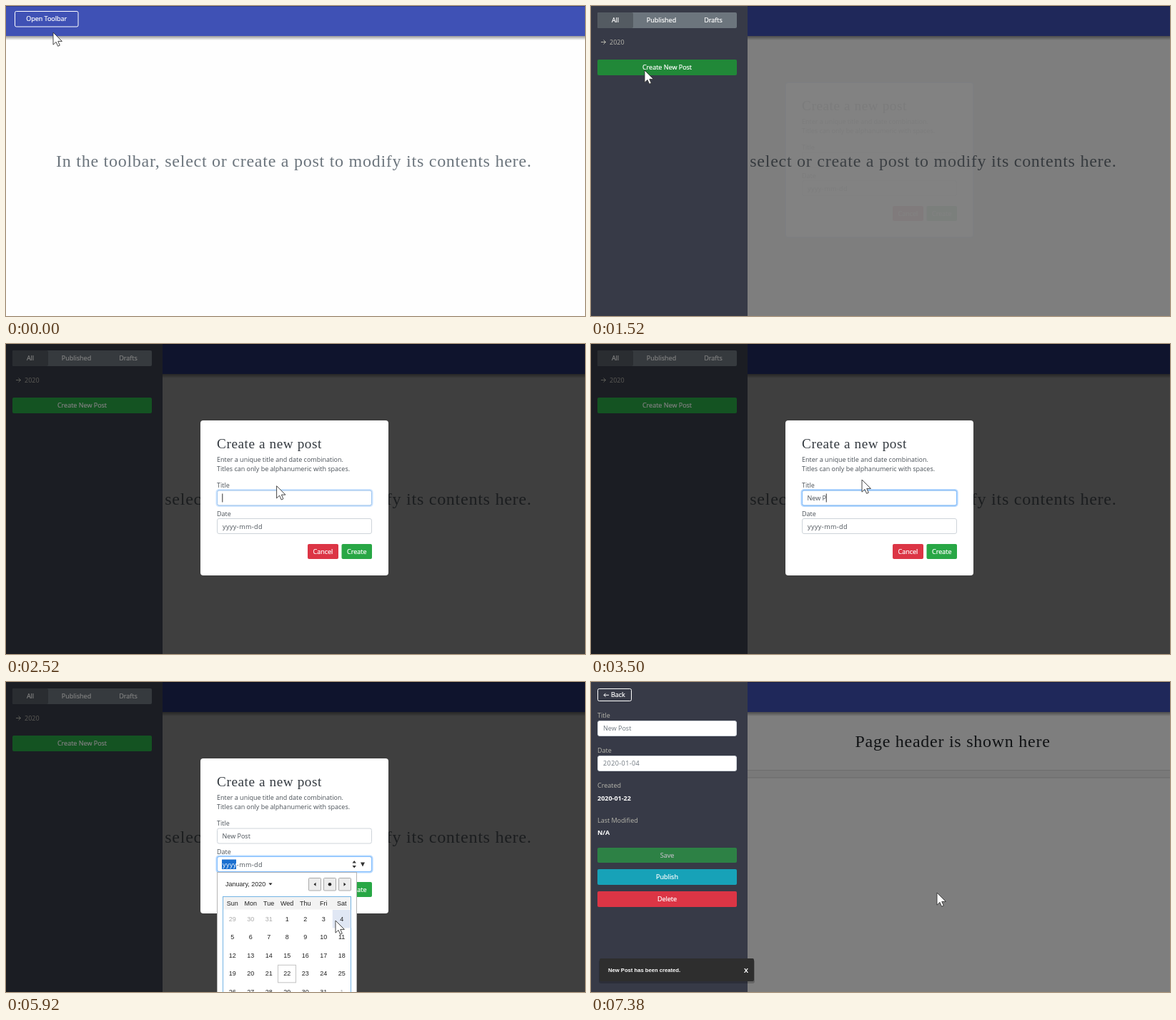
An HTML page that plays this animation: 810x434 px, repeating every 8.66 s.

```html
<!DOCTYPE html>
<html lang="en">
<head>
<meta charset="utf-8">
<title>Create a post</title>
<style>
html, body { margin: 0; width: 100%; height: 100%; overflow: hidden; background: #fff; }
svg { display: block; width: 100vw; height: 100vh; }
text { font: 9px 'Open Sans', sans-serif; white-space: pre; }
.serif { font-family: 'Liberation Serif', serif; font-size: 24px; letter-spacing: .031em; }
.head { font-size: 19.2px; fill: #343a40; }
.white { fill: #fff; stroke: #fff; stroke-width: .22px; }
.bold { font-weight: 700; fill: #fff; }
.soft { fill: #b8b7ad; }
.ink { fill: #495057; }
.hint { fill: #6c757d; }
.date { letter-spacing: .42px; }
.cal { font-family: 'Liberation Sans', sans-serif; fill: #222; }
.off { fill: #aaa; }
.toast { font: 700 7.65px 'Liberation Sans', sans-serif; fill: #fff; }
</style>
</head>
<body>
<svg id="stage" viewBox="0 0 810 434" preserveAspectRatio="none"></svg>
<script>
const LOOP = 8660;
const GREEN = '#28a745', RED = '#dc3545', TEAL = '#17a2b8';

const rect = (x, y, w, h, fill, extra = '') =>
  `<rect x="${x}" y="${y}" width="${w}" height="${h}" fill="${fill}" ${extra}/>`;
const text = (x, y, str, cls = '', extra = '') =>
  `<text x="${x}" y="${y}" class="${cls}" ${extra}>${str}</text>`;
const mid = (x, y, str, cls, extra = '') => text(x, y, str, cls, `text-anchor="middle" ${extra}`);
const group = (id, body, extra = '') => `<g id="${id}" ${extra}>${body}</g>`;
const button = (x, y, w, h, label, fill, id = '') =>
  rect(x, y, w, h, fill, `rx="2" id="${id}"`) + mid(x + w / 2, y + h / 2 + 3.2, label, 'white');
const field = (x, y, w, ring) =>
  rect(x + .5, y + .5, w - 1, 21, '#fff', 'rx="2.5" stroke="#ced4da"') +
  (ring ? group(ring,
    rect(x - .6, y - .6, w + 1.2, 23.2, 'none', 'rx="3.5" stroke="#007bff" stroke-opacity=".28" stroke-width="2"') +
    rect(x + .5, y + .5, w - 1, 21, 'none', 'rx="2.5" stroke="#80bdff"')) : '');

function page() {
  const hint = 'In the toolbar, select or create a post to modify its contents here.';
  return rect(0, 0, 810, 434, '#fefefe') +
    rect(0, 42, 810, 6, 'url(#shade)') +
    rect(0, 0, 810, 42, '#3f51b5') + rect(0, 0, 810, 1, '#000', 'opacity=".25"') +
    rect(12.5, 7.5, 88.5, 21.5, 'none', 'rx="2" stroke="#fff"') +
    mid(56.7, 21.2, 'Open Toolbar', 'white') +
    group('hint', text(70, 225, hint, 'serif hint')) +
    group('preview', mid(506, 91, 'Page header is shown here', 'serif', 'fill="#212529"') +
      rect(219, 123, 591, 11, '#f4f4f4') +
      rect(219, 123, 591, 1, '#dcdcdc') + rect(219, 133.5, 591, 1, '#d6d6d6'));
}

function listPanel() {
  return rect(9, 9, 195, 22, '#6c757d', 'rx="2"') + rect(9, 9, 50, 22, '#545b62', 'rx="2"') +
    mid(34, 23.2, 'All', 'white') + mid(98.5, 23.2, 'Published', 'white') + mid(171, 23.2, 'Drafts', 'white') +
    '<path d="M14 50.5h6.5m-3-3 3 3-3 3" fill="none" stroke="#b8b7ad"/>' +
    text(26, 53.8, '2020', 'soft') +
    button(9, 75, 195, 22, 'Create New Post', GREEN, 'newPost');
}

function postPanel() {
  return rect(9.5, 9.5, 47, 17, 'none', 'rx="2" stroke="#fff"') +
    '<path d="M25 18.3h-7m2.5-2.5-2.5 2.5 2.5 2.5" fill="none" stroke="#fff"/>' +
    text(28, 21.3, 'Back', 'white') +
    text(9, 50, 'Title', 'soft') + field(9, 54, 195) + text(17, 68.2, 'New Post', 'hint') +
    text(9, 99, 'Date', 'soft') + field(9, 103, 195) + text(17, 117.2, '2020-01-04', 'hint date') +
    text(9, 147.8, 'Created', 'soft') + text(9, 165.7, '2020-01-22', 'bold') +
    text(9, 196.5, 'Last Modified', 'soft') + text(9, 214.4, 'N/A', 'bold') +
    `<g opacity=".65">${button(9, 232, 195, 21, 'Save', GREEN)}</g>` +
    button(9, 262, 195, 22, 'Publish', TEAL) + button(9, 293, 195, 22, 'Delete', RED);
}

function modal() {
  return rect(272, 107, 263, 217, '#fff', 'rx="4"') +
    rect(272, 107, 263, 217, 'none', 'id="outline" rx="4" stroke="#5b93d6" stroke-width="1.5"') +
    text(295, 146, 'Create a new post', 'serif head') +
    text(295, 165, 'Enter a unique title and date combination.', 'ink') +
    text(295, 178.4, 'Titles can only be alphanumeric with spaces.', 'ink') +
    text(295, 201, 'Title', 'ink') + field(295, 204.5, 217, 'titleRing') +
    text(302.5, 218.8, '', 'ink', 'id="title"') + rect(302, 209.5, 1, 12, '#333', 'id="caret"') +
    text(295, 240.8, 'Date', 'ink') + field(295, 244, 217, 'dateRing') +
    rect(302, 248.5, 20, 13.5, '#1a6fd0', 'id="select"') +
    text(303, 258.5, '<tspan id="year"></tspan><tspan id="rest"></tspan>', 'ink date') +
    group('spinner', '<path d="M484.5 253.5l2.7-3.5 2.7 3.5zM484.5 257l2.7 3.5 2.7-3.5zM496 252.5h6l-3 6z" fill="#333"/>') +
    button(422, 280, 43, 21, 'Cancel', RED) + button(469.5, 280, 42.5, 21, 'Create', GREEN);
}

function calendar() {
  const colX = c => 316.7 + c * 25.5;
  let s = rect(295.5, 266.5, 195, 180, '#fff', 'stroke="#b5b5b5"') +
    text(307, 286.3, 'January, 2020', 'cal') + '<path d="M367.5 281.5h5l-2.5 3z" fill="#222"/>';
  for (const x of [423.5, 444.5, 465.5])
    s += rect(x, 274.5, 17, 17.5, '#ececec', 'rx="1" stroke="#aaa"');
  s += '<path d="M433.5 280.8v5l-3-2.5zM472.5 280.8v5l3-2.5z" fill="#222"/><circle cx="453" cy="283.3" r="2.3" fill="#222"/>' +
    rect(303.5, 300.5, 179, 150, '#fff', 'stroke="#74b4e4"') + rect(304, 301, 178, 17.5, '#f3f3f3') +
    rect(0, 0, 25.5, 25.4, '#e0e7f4', 'id="hover"') +
    rect(380.5, 396.3, 25, 24.5, 'none', 'stroke="#c4c4c4"');
  ['Sun', 'Mon', 'Tue', 'Wed', 'Thu', 'Fri', 'Sat'].forEach((d, c) => s += mid(colX(c), 312.6, d, 'cal'));
  for (let i = 0; i < 35; i++) {
    const n = i - 2, out = n < 1 || n > 31;
    s += mid(colX(i % 7), 335 + Math.floor(i / 7) * 25.4, n < 1 ? n + 31 : n > 31 ? n - 31 : n,
      out ? 'cal off' : 'cal');
  }
  return s;
}

const pointer = (id, d) => `<path id="${id}" d="${d}" fill="#fff" stroke="#333" stroke-width=".9" stroke-linejoin="round"/>`;

const stage = document.getElementById('stage');
stage.innerHTML =
  '<defs><linearGradient id="shade" x2="0" y2="1"><stop stop-opacity=".4"/><stop offset="1" stop-opacity="0"/></linearGradient></defs>' +
  page() + rect(0, 0, 810, 434, '#000', 'id="overlay"') +
  group('sidebar', rect(0, 0, 219, 434, '#373a47') + group('list', listPanel()) + group('post', postPanel())) +
  rect(0, 0, 810, 434, '#000', 'id="backdrop"') +
  group('modal', modal()) + group('calendar', calendar()) +
  group('toast', rect(11, 389, 218, 33, '#000', 'rx="3" opacity=".2"') + rect(12, 387, 216, 32, '#2e2e2e', 'rx="2"') +
    text(24, 405.8, 'New Post has been created.', 'toast') + mid(217, 406.5, 'X', 'bold')) +
  group('cursor',
    pointer('arrow', 'M0 0V17.2L4 13.4 6.6 19.3 9.3 18.1 6.8 12.4H12.4Z') +
    pointer('hand', 'M-1.7 1.5a1.9 1.9 0 0 1 3.8 0V7q2.2-1 3.2.8 2.3-.8 3 .9 2.3-.4 2.3 1.8V14q0 3-2 5v3H.5V20.5Q-2 18-4 15q-3.5-2.5-2.5-4 1.5-1.5 4 .8Z') +
    '<path id="beam" d="M-3-8q3 0 3 2 0-2 3-2M0-6V6M-3 8q3 0 3-2 0 2 3 2" fill="none" stroke="#333"/>');

const el = {};
stage.querySelectorAll('[id]').forEach(n => { if (n.id) el[n.id] = n; });

const ramp = (t, a, b) => Math.min(1, Math.max(0, (t - a) / (b - a)));
const easeOut = p => 1 - (1 - p) ** 3;
const easeBoth = p => p * p * (3 - 2 * p);
const fade = (id, v) => el[id].setAttribute('opacity', v);
const show = (id, on) => { el[id].style.display = on ? '' : 'none'; };

// start, end, x, y of each pointer move
const moves = [
  [0, 0, 66, 37], [190, 320, 61, 13], [850, 1400, 75, 90], [1860, 2300, 378, 212],
  [2390, 2620, 379, 190], [4220, 4740, 514, 291], [4740, 5030, 499, 256],
  [5250, 5910, 461, 334], [6200, 6920, 484, 295]
];
function pointerAt(t) {
  let [, , x, y] = moves[0];
  for (const [a, b, nx, ny] of moves.slice(1)) {
    const p = easeBoth(ramp(t, a, b));
    x += (nx - x) * p;
    y += (ny - y) * p;
  }
  return [x, y];
}

const keys = [2850, 2950, 3060, 3170, 3500, 3610, 3640, 3730];

function draw(t) {
  const [x, y] = pointerAt(t);
  const saved = t >= 7260, picked = t >= 6140;

  const slide = easeOut(ramp(t, 500, 1040));
  el.sidebar.setAttribute('transform', `translate(${-222 * (1 - slide)} 0)`);
  fade('overlay', .5 * ramp(t, 500, 820));
  show('hint', !saved);
  show('preview', saved);
  show('list', !saved);
  show('post', saved);
  const onNew = x > 9 && x < 204 && y > 75 && y < 97 && t < 1620;
  el.newPost.setAttribute('fill', onNew ? '#218838' : GREEN);

  fade('backdrop', .5 * ramp(t, 1520, 1795) * (1 - ramp(t, 7135, 7370)));
  fade('modal', ramp(t, 1515, 1730) * (1 - .25 * ramp(t, 7000, 7140) - .75 * ramp(t, 7150, 7260)));
  fade('outline', 1 - ramp(t, 2150, 2300));

  const typed = keys.filter(k => t >= k).length;
  el.title.textContent = 'New Post'.slice(0, typed);
  fade('titleRing', ramp(t, 2380, 2600) * (1 - ramp(t, 5130, 5290)));
  show('caret', t >= 2400 && t < 5150);
  if (t >= 2400 && t < 5150)
    el.caret.setAttribute('x', 302.3 + (typed ? el.title.getComputedTextLength() : 0));

  const dateFocus = t >= 5150 && t < 6920;
  fade('dateRing', ramp(t, 5130, 5290) * (1 - ramp(t, 6880, 7020)));
  show('select', dateFocus && !picked);
  el.year.textContent = picked ? '2020' : 'yyyy';
  el.year.setAttribute('fill', dateFocus && !picked ? '#fff' : '#495057');
  el.rest.textContent = picked ? '-01-04' : '-mm-dd';
  const overDate = x > 295 && x < 512 && y > 244 && y < 266 && t > 4200;
  show('spinner', dateFocus || overDate);

  show('calendar', t >= 5150 && !picked);
  fade('calendar', ramp(t, 5130, 5250));
  const col = Math.floor((x - 304) / 25.5), row = Math.floor((y - 319) / 25.4);
  show('hover', col >= 0 && col < 7 && row >= 0);
  el.hover.setAttribute('x', 304 + Math.min(col, 6) * 25.5 - .2);
  el.hover.setAttribute('y', 319 + row * 25.4);

  fade('toast', ramp(t, 7250, 7370));

  const hand = (t >= 270 && t < 700) || (t > 6500 && !saved && x > 469 && y > 280 && y < 301);
  const beam = t > 2000 && t < 2620 && y > 204 && y < 227;
  show('hand', hand);
  show('beam', beam);
  show('arrow', !hand && !beam);
  el.cursor.setAttribute('transform', `translate(${x} ${y})`);
}

const start = performance.now();
function tick(now) {
  draw(Math.max(0, now - start) % LOOP);
  requestAnimationFrame(tick);
}
draw(0);
requestAnimationFrame(tick);
</script>
</body>
</html>
```
